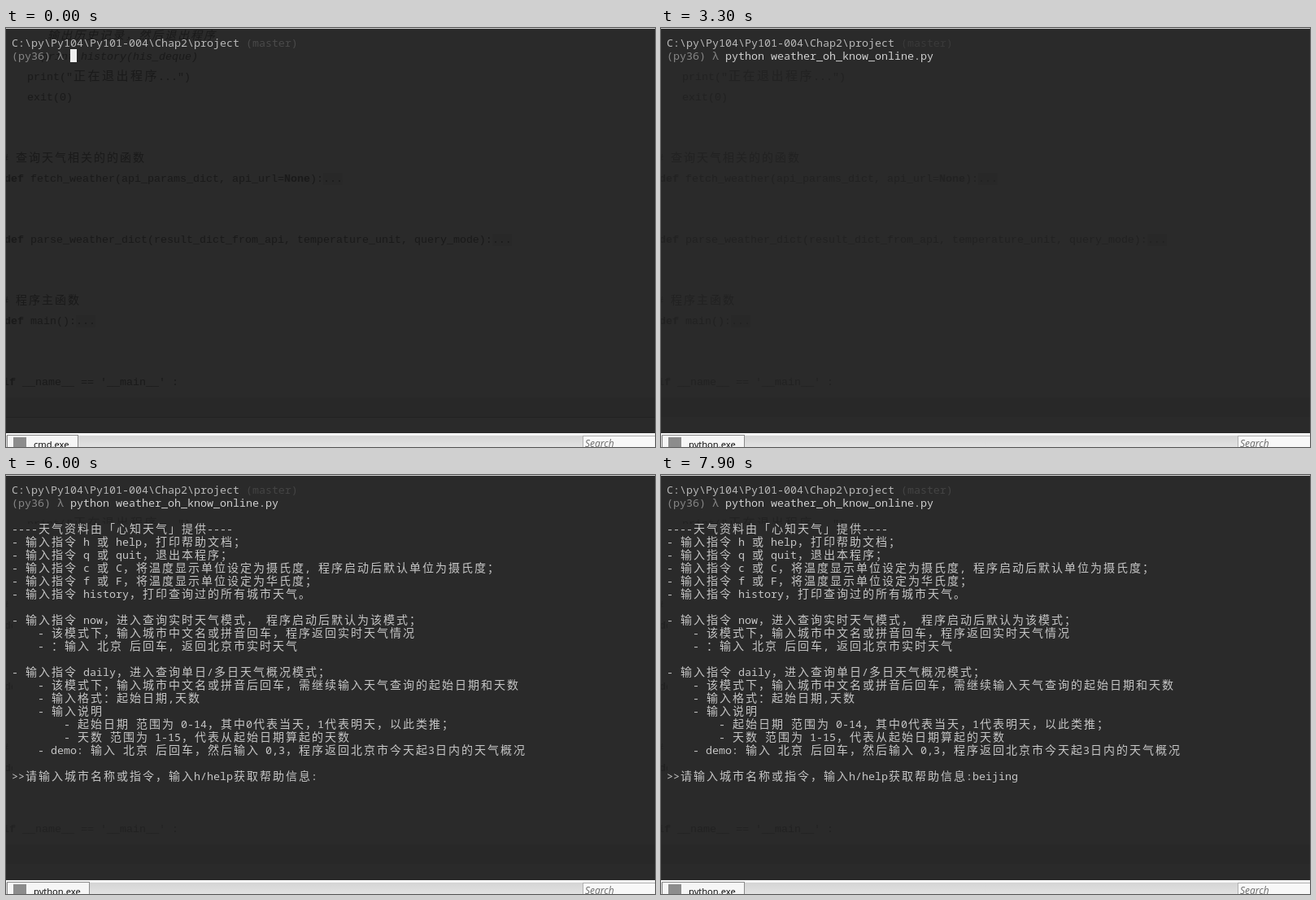
An HTML page that plays this animation: 798x515 px, repeating every 8000 ms.

```html
<!DOCTYPE html>
<html lang="zh-CN">
<head>
<meta charset="utf-8">
<title>Terminal</title>
<style>
html, body { margin: 0; width: 100%; height: 100%; overflow: hidden; background: #2a2a2a; }
#stage { position: relative; width: 798px; height: 515px; overflow: hidden; background: #2a2a2a; }
#stage div { position: absolute; white-space: pre; }
#stage, #stage * { box-sizing: border-box; text-spacing-trim: space-all; }
.anim { animation: 8s step-end infinite; }

/* editor behind the translucent window */
#ghost { inset: 0; color: #1a1a1a; animation-name: fade; }
#ghost div { font: 13.333px/25px "Liberation Mono", monospace; }
#ghost .anim { animation-name: first; }
.fold { background: #282828; }
.zh { position: relative; left: 1px; font-family: "Noto Sans CJK SC", "Noto Sans CJK", sans-serif;
  font-size: 14px; font-weight: 300; line-height: 0; letter-spacing: 2px; }
.big .zh { font-size: 15px; letter-spacing: 2.5px; }

/* terminal */
#term div { left: 7px; height: 16px; font: 13.333px/16px "Noto Sans Mono", monospace; color: #c6c6c6; }
#term .path { color: #b8b8b8; }
#term .dim { color: #868686; }
#term .branch { animation-name: branch; }
#term .cmd { left: 79px; color: #cfcfcf; animation-name: cmd; }
#term .input { left: 383px; overflow: hidden; width: 0; animation-name: typing; }
#out { visibility: hidden; animation-name: out; }
#term .wipe { left: 8px; top: 60px; width: 631px; height: 318px; background: #2a2a2a; }
#term .caret { background: #f0f0f0; left: 79px; top: 26px; width: 8px; animation-name: caret; }

/* status bar */
#bar { left: 0; top: 498px; width: 798px; height: 17px; overflow: hidden;
  background: linear-gradient(#fafafa 0, #f4f4f4 3px, #d4d4d4 3px, #e2e2e2 17px); }
#bar div { font: 11.2px/14px "Open Sans", sans-serif; color: #000; }
#bar .tab { left: 1px; top: 2px; width: 88px; height: 20px; background: #f6f6f6; border: 1px solid #8a8a8a; animation-name: tab; }
#bar .icon { left: 9px; top: 5px; width: 16px; height: 16px; background: #8c8c8c; }
#bar .title { left: 34px; top: 7px; }
#bar .shell { animation-name: first-title; }
#bar .python { visibility: hidden; animation-name: second-title; }
#bar .search { left: 709px; top: 3px; width: 95px; height: 20px; padding-left: 2px; background: #f8f8f8;
  border: 1px solid #b0b0b0; font: italic 12px/18px "Open Sans", sans-serif; color: #6c6c6c; }

@keyframes fade { 0% { color: #1a1a1a } 17.5%, 100% { color: #222 } }
@keyframes first { 0% { visibility: visible } 17.5%, 100% { visibility: hidden } }
@keyframes branch { 0% { color: #4a4a4a } 17.5% { color: #3a3a3a } 43.75%, 100% { color: #444 } }
@keyframes cmd { 0% { visibility: hidden } 23.75%, 100% { visibility: visible } }
@keyframes out { 0% { visibility: hidden } 43.75%, 100% { visibility: visible } }
@keyframes tab { 0% { width: 88px } 38.75%, 100% { width: 102px } }
@keyframes first-title { 0% { visibility: visible } 38.75%, 100% { visibility: hidden } }
@keyframes second-title { 0% { visibility: hidden } 38.75%, 100% { visibility: visible } }
@keyframes typing {
  0% { width: 0 }
  83.75% { width: 8px }
  85% { width: 16px }
  86.25% { width: 24px }
  87.5% { width: 32px }
  88.75% { width: 40px }
  91.25% { width: 48px }
  92.5%, 100% { width: 56px }
}
@keyframes caret {
  0% { left: 79px; top: 26px; width: 8px; opacity: 1 }
  17.5% { left: 79px; top: 26px; width: 2px; opacity: 1 }
  23.75% { left: 343px; top: 26px; width: 2px; opacity: 1 }
  30% { left: 343px; top: 26px; width: 2px; opacity: 0 }
  35% { left: 7px; top: 42px; width: 2px; opacity: 1 }
  41.25% { left: 7px; top: 42px; width: 2px; opacity: 0 }
  43.75%, 56.25%, 68.75%, 81.25% { left: 383px; top: 362px; width: 2px; opacity: 1 }
  50%, 62.5%, 75% { left: 383px; top: 362px; width: 2px; opacity: 0 }
  83.75% { left: 391px; top: 362px; width: 2px; opacity: 1 }
  85% { left: 399px; top: 362px; width: 2px; opacity: 1 }
  86.25% { left: 407px; top: 362px; width: 2px; opacity: 1 }
  87.5% { left: 415px; top: 362px; width: 2px; opacity: 1 }
  88.75% { left: 423px; top: 362px; width: 2px; opacity: 1 }
  91.25% { left: 431px; top: 362px; width: 2px; opacity: 1 }
  92.5% { left: 439px; top: 362px; width: 2px; opacity: 1 }
  98.75%, 100% { left: 439px; top: 362px; width: 2px; opacity: 0 }
}
</style>
</head>
<body>
<div id="stage">
  <div id="ghost" class="anim"></div>
  <div id="term">
    <div class="path" style="top:10px">C:\py\Py104\Py101-004\Chap2\project <span class="branch anim">(master)</span></div>
    <div class="dim" style="top:26px">(py36) λ</div>
    <div class="cmd anim" style="top:26px">python weather_oh_know_online.py</div>
    <section id="out" class="anim"><div class="wipe"></div></section>
    <div class="input anim" style="top:362px">beijing</div>
    <div class="caret anim"></div>
  </div>
  <div style="left:0;top:0;width:798px;height:1px;background:#d0d0d0"></div>
  <div id="bar">
    <div class="tab anim"></div>
    <div class="icon"></div>
    <div class="title shell anim">cmd.exe</div>
    <div class="title python anim">python.exe</div>
    <div class="search">Search</div>
  </div>
</div>
<script>
const HELP = `----天气资料由「心知天气」提供----
- 输入指令 h 或 help，打印帮助文档；
- 输入指令 q 或 quit，退出本程序；
- 输入指令 c 或 C，将温度显示单位设定为摄氏度, 程序启动后默认单位为摄氏度；
- 输入指令 f 或 F，将温度显示单位设定为华氏度；
- 输入指令 history，打印查询过的所有城市天气。

- 输入指令 now，进入查询实时天气模式， 程序启动后默认为该模式；
    - 该模式下，输入城市中文名或拼音回车，程序返回实时天气情况
    - ：输入 北京 后回车, 返回北京市实时天气

- 输入指令 daily，进入查询单日/多日天气概况模式；
    - 该模式下，输入城市中文名或拼音后回车，需继续输入天气查询的起始日期和天数
    - 输入格式：起始日期,天数
    - 输入说明
        - 起始日期 范围为 0-14，其中0代表当天，1代表明天，以此类推；
        - 天数 范围为 1-15，代表从起始日期算起的天数
    - demo: 输入 北京 后回车，然后输入 0,3，程序返回北京市今天起3日内的天气概况

&gt;&gt;请输入城市名称或指令，输入h/help获取帮助信息:`;

const fold = '<span class="fold">...</span>';
// left, vertical centre, markup, extra class
const CODE = [
  [50, 10, '<i>输出历史记录，然后退出程序</i>', 'anim'],
  [44, 35, '<i>print_history(his_deque)</i>', 'anim'],
  [26, 60, 'print("<span class="big">正在退出程序</span>...")'],
  [26, 85, 'exit(0)'],
  [-5, 160, '# 查询天气相关的的函数'],
  [-2, 185, '<b>def</b> fetch_weather(api_params_dict, api_url=<b>None</b>):' + fold],
  [-2, 260, '<b>def</b> parse_weather_dict(result_dict_from_api, temperature_unit, query_mode):' + fold],
  [-5, 335, '# 程序主函数'],
  [-2, 360, '<b>def</b> main():' + fold],
  [-4, 435, "<b>if</b> __name__ == '__main__' :"],
];

const wide = s => s.replace(/[\u3000-\u9fff\uff00-\uffef]+/g, '<span class="zh">$&</span>');

function add(parent, left, top, html, cls = '') {
  const el = document.createElement('div');
  el.className = cls;
  el.style.top = top + 'px';
  if (left !== null) el.style.left = left + 'px';
  el.innerHTML = wide(html);
  parent.append(el);
  return el;
}

const ghost = document.getElementById('ghost');
for (const [x, y, html, cls] of CODE) add(ghost, x, y - 12.5, html, cls);
const band = add(ghost, 0, 454, '');
band.style.cssText += 'width:798px;height:24px;background:#282828';
const rule = add(ghost, 0, 478, '', 'anim');
rule.style.cssText += 'width:798px;height:1px;background:#222';

const out = document.getElementById('out');
HELP.split('\n').forEach((line, i) => line && add(out, null, 58 + 16 * i, line));
</script>
</body>
</html>
```
